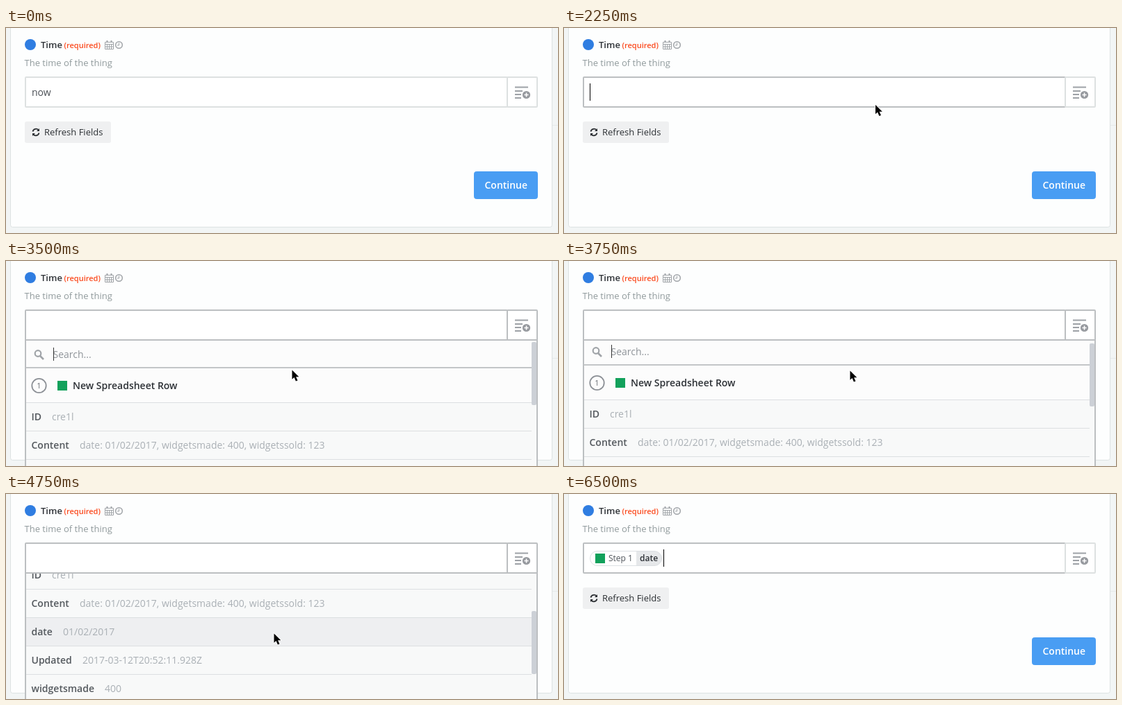
These frames come from a looping animation (794x296 px, 7000 ms). An HTML page:

```html
<!DOCTYPE html>
<html lang="en">
<head>
<meta charset="utf-8">
<title>Time field</title>
<style>
  html, body { margin: 0; width: 100%; height: 100%; overflow: hidden; background: #f2f5f5; }
  svg { display: block; width: 794px; height: 296px; font: 14px "Open Sans", sans-serif; }
  .bold { font-weight: 600; }
  .small { font-size: 13px; }
  .chip { font-size: 12px; }
  .key { font-weight: 600; fill: #54595e; }
  .pale { fill: #aab0b5; }
  .line { fill: none; stroke: #a0a4a8; }
</style>
</head>
<body>
<svg viewBox="0 0 794 296">
  <defs>
    <clipPath id="listClip"><rect x="29" y="115" width="734" height="181"/></clipPath>
  </defs>

  <path d="M786 140.5h8" stroke="#e6eaea"/>
  <rect x="6.5" y="-9.5" width="779" height="297" rx="3" fill="#fdfefe" stroke="#dde2e2"/>

  <circle cx="35" cy="24" r="8" fill="#2f7de1"/>
  <text class="bold small" x="50" y="29" fill="#2d3136">Time</text>
  <text class="bold" x="83.5" y="29" font-size="11" fill="#fb4a1e">(required)</text>
  <g class="line">
    <path d="M142.5 20.5h12v10h-12zM142.5 23.5h12M145.5 24v6M148.5 24v6M151.5 24v6M143 27h11"/>
    <path d="M145.5 18v3M151.5 18v3" stroke-width="2"/>
    <circle cx="162.5" cy="24.5" r="4.8" stroke-width="1.5"/>
    <path d="M162.5 21.5v3.5h-2.5"/>
  </g>
  <text class="small" x="26.5" y="55" fill="#909a9c">The time of the thing</text>

  <rect x="27" y="135" width="124" height="31" rx="3" fill="#eff0f1"/>
  <g fill="none" stroke="#2b2f33" stroke-width="1.8">
    <path d="M38.5 149.5a4.7 4.7 0 0 1 8.3-2M47.5 151.5a4.7 4.7 0 0 1-8.3 2"/>
    <path d="M48 145v4h-4zM38 156v-4h4z" fill="#2b2f33" stroke="none"/>
  </g>
  <text class="small" x="55" y="155" fill="#2b2f33">Refresh Fields</text>

  <rect id="button" x="673.5" y="207.5" width="91" height="39" rx="3"/>
  <text id="buttonText" class="bold" x="688.5" y="232">Continue</text>

  <rect id="input" x="28" y="71" width="693" height="43" rx="1" fill="#fff" stroke-width="2"/>
  <rect id="picker" x="721" y="71" width="43" height="43" rx="1" stroke-width="2"/>
  <path d="M732 85.5h19M732 91h11M732 96h9M732 101h9" stroke="#9da1a6" stroke-width="2"/>
  <circle cx="748.5" cy="96.5" r="5.6" fill="#96999e"/>
  <path d="M745.5 96.5h6M748.5 93.5v6" stroke="#fff" stroke-width="1.6"/>
  <text id="value" x="37" y="98" fill="#4a4f55"></text>

  <g id="chip">
    <rect x="37.5" y="82.5" width="103" height="21" rx="10.5" fill="#fff"/>
    <path d="M104 82.5h26a10.5 10.5 0 0 1 0 21h-26z" fill="#e6e8ea"/>
    <rect x="37.5" y="82.5" width="103" height="21" rx="10.5" fill="none" stroke="#dce0e3"/>
    <rect x="45" y="86" width="14" height="14" fill="#12a15b"/>
    <text class="chip" x="64" y="97" fill="#50555b">Step 1</text>
    <text class="chip bold" x="109" y="97" fill="#2d3136">date</text>
  </g>
  <rect id="caret" y="80" width="1" height="25"/>

  <g id="list">
    <rect x="28" y="114" width="736" height="200" fill="#f8f9f9" stroke="#bcbfc1" stroke-width="2"/>
    <g clip-path="url(#listClip)">
      <g id="scroller">
        <rect x="29" y="115" width="727" height="89" fill="#fcfcfc"/>
        <rect x="29" y="153" width="727" height="2" fill="#c3c6c8"/>
        <circle cx="46" cy="133.5" r="4.3" class="line" stroke-width="2.2"/>
        <path class="line" d="M49 137l5 5" stroke-width="2.6"/>
        <text class="pale" x="67.5" y="140" style="fill:#8f9499">Search...</text>
        <rect x="68" y="125" width="1" height="19" fill="#333"/>
        <circle cx="47.5" cy="180" r="10.2" fill="none" stroke="#8c9096" stroke-width="1.8"/>
        <text x="47.5" y="184" text-anchor="middle" font-size="11" fill="#6a6f75">1</text>
        <rect x="74" y="173" width="14" height="14" fill="#12a15b"/>
        <text class="bold" x="96" y="185" fill="#2d3136">New Spreadsheet Row</text>
        <rect id="hover" x="29" y="287" width="727" height="40" fill="#eeeff1"/>
        <g id="rows"></g>
      </g>
      <rect id="thumb" x="756" y="117" width="7" height="91" rx="2" fill="#ccd0d6"/>
    </g>
  </g>

  <path id="pointer" d="M0 0V13.2L3 10.5L5.4 16L8 14.9L5.6 9.7H9.8Z" stroke="#fff" paint-order="stroke" stroke-width="1.6"/>
</svg>

<script>
const $ = id => document.getElementById(id);
const set = (id, attrs) => {
  for (const name in attrs) $(id).setAttribute(name, attrs[name]);
};
const show = (id, on) => set(id, { visibility: on ? "visible" : "hidden" });

// key, value, x of the value
const fields = [
  ["ID", "cre1l", 66],
  ["Content", "date: 01/02/2017, widgetsmade: 400, widgetssold: 123", 106],
  ["date", "01/02/2017", 82],
  ["Updated", "2017-03-12T20:52:11.928Z", 110],
  ["widgetsmade", "400", 142]
];
$("rows").innerHTML = fields.map(([key, value, x], i) => {
  const y = 230 + 41 * i;
  return `<path d="M29 ${y - 25.5}h727" stroke="#dcdfe1"/>
    <text class="key" x="36.5" y="${y}">${key}</text>
    <text class="pale" x="${x}" y="${y}">${value}</text>`;
}).join("");

const LOOP = 7000, LIGHT = "#dde1e1", DARK = "#bcbfc1";

// Each step changes only the properties it names.
const steps = [
  [0, { pointer: null, value: "now", caret: null, focus: false, over: false, shaded: false,
        ready: true, open: false, scroll: 0, hover: false, chip: false }],
  [250, { pointer: [30, 77] }],
  [500, { pointer: [46, 93] }],
  [750, { pointer: [53, 95] }],
  [1000, { pointer: [67, 95], focus: true, caret: 64 }],
  [1250, { pointer: [71.5, 95.5], caret: null }],
  [1750, { value: "no", caret: 53 }],
  [2000, { pointer: [144, 106], value: "n", caret: 45 }],
  [2250, { pointer: [448, 111], value: "", caret: 37 }],
  [2500, { pointer: [739, 108], over: true, ready: false }],
  [2750, { pointer: [741.5, 106.5], shaded: true, caret: null }],
  [3000, { focus: false }],
  [3250, { open: true }],
  [3500, { pointer: [411.5, 157.5], over: false, shaded: false }],
  [3750, { pointer: [411.5, 158.5], scroll: 4 }],
  [4000, { pointer: [403.5, 161.5], scroll: 56 }],
  [4250, { pointer: [418, 161], scroll: 108 }],
  [4500, { pointer: [384.5, 200.5], hover: true }],
  [4750, { pointer: [385.5, 201.5] }],
  [5500, { open: false, focus: true, ready: true, chip: true, caret: 143 }],
  [6000, { pointer: [622, 108], caret: null }],
  [6250, { pointer: null }],
  [6500, { caret: 143 }]
];

function draw(time) {
  const s = Object.assign({}, ...steps.filter(([at]) => at <= time).map(([, change]) => change));

  set("input", { stroke: s.focus || s.open ? DARK : LIGHT });
  set("picker", { stroke: s.over || s.open ? DARK : LIGHT, fill: s.shaded ? "#f5f6f7" : "#fff" });
  set("button", s.ready ? { fill: "#499df3", stroke: "#499df3" } : { fill: "#dce0e3", stroke: "#d0d5d8" });
  set("buttonText", { fill: s.ready ? "#fff" : "#a9b1b6" });
  $("value").textContent = s.value;

  show("caret", s.caret !== null);
  if (s.caret !== null) set("caret", { x: s.caret });
  show("pointer", s.pointer);
  if (s.pointer) set("pointer", { transform: `translate(${s.pointer})` });

  show("chip", s.chip);
  show("list", s.open);
  show("hover", s.open && s.hover);
  set("scroller", { transform: `translate(0 ${-s.scroll})` });
  set("thumb", { y: 117 + Math.round(s.scroll * 0.482) });
}

const start = performance.now();
function tick() {
  draw((performance.now() - start) % LOOP);
  requestAnimationFrame(tick);
}
tick();
</script>
</body>
</html>
```
